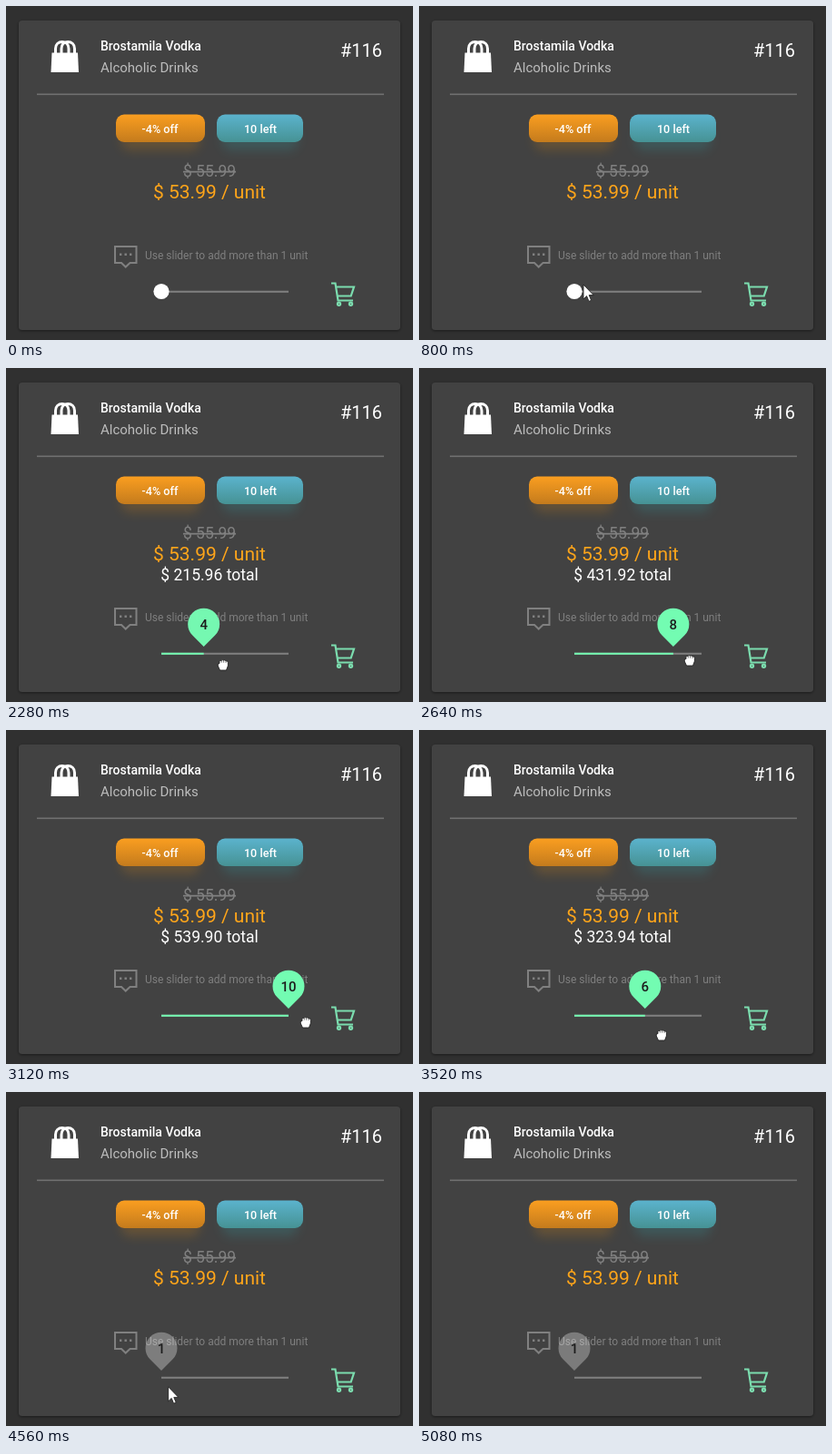
An HTML page that plays this animation: 448x368 px, repeating every 5920 ms.

```html
<!DOCTYPE html>
<html lang="en">
<head>
<meta charset="utf-8">
<title>Product card with quantity slider</title>
<style>
  html, body { margin: 0; width: 100%; height: 100%; overflow: hidden; background: #303030; }
  svg { display: block; width: 448px; height: 368px; font-family: Roboto, sans-serif; }
  .mid { text-anchor: middle; }
  .medium { font-weight: 500; }
  .line { fill: none; stroke-width: 2; }
</style>
</head>
<body>
<svg viewBox="0 0 448 368">
  <defs>
    <linearGradient id="orange" x2="0" y2="1"><stop stop-color="#fa9e20"/><stop offset="1" stop-color="#c47b1d"/></linearGradient>
    <linearGradient id="teal" x2="0" y2="1"><stop stop-color="#5bb3cd"/><stop offset="1" stop-color="#469294"/></linearGradient>
    <filter id="glow" x="-30%" y="-60%" width="160%" height="240%"><feGaussianBlur stdDeviation="6"/></filter>
    <filter id="shade" x="-5%" y="-5%" width="110%" height="110%"><feDropShadow dx="0" dy="1" stdDeviation="1.5" flood-opacity=".45"/></filter>
  </defs>

  <rect width="448" height="368" fill="#303030"/>
  <rect x="14" y="16" width="420" height="341" rx="4" fill="#424242" filter="url(#shade)"/>

  <g id="bag">
    <path d="M50.5 51.5H79L80 73H49.5Z" fill="#fff"/>
    <path d="M54.5 53V47C54.5 37 69 37 69 47V53M61 53V47C61 37 75.5 37 75.5 47V53" class="line" stroke="#fff" style="stroke-width:3"/>
  </g>
  <text x="104" y="49" font-size="14" class="medium" fill="#fff">Brostamila Vodka</text>
  <text x="104" y="72.5" font-size="15" fill="#bdbdbd">Alcoholic Drinks</text>
  <text x="414" y="55.5" font-size="20" text-anchor="end" fill="#fff">#116</text>
  <rect x="34" y="96.5" width="382" height="1.6" fill="#707070"/>

  <g filter="url(#glow)" opacity=".22">
    <rect x="127" y="132" width="86" height="27" rx="9" fill="#e08a10"/>
    <rect x="238" y="132" width="83" height="27" rx="9" fill="#30a5ad"/>
  </g>
  <rect x="121" y="119.5" width="98" height="30.5" rx="9" fill="url(#orange)"/>
  <rect x="232" y="119.5" width="95" height="30.5" rx="9" fill="url(#teal)"/>
  <g class="mid medium" font-size="12.6" fill="#fff">
    <text x="169.5" y="139.5">-4% off</text>
    <text x="280" y="139.5">10 left</text>
  </g>

  <g class="mid">
    <text x="224" y="188" font-size="17.5" fill="#808080" text-decoration="line-through">$ 55.99</text>
    <text x="224" y="212" font-size="21" fill="#ffa51a">$ 53.99 / unit</text>
    <text id="total" x="224" y="234" font-size="17.5" fill="#fff"></text>
  </g>

  <path d="M120 265H143.5V283H136.5L131.7 287.5L127 283H120Z" class="line" stroke="#808080"/>
  <path d="M125 273.7h2.4m3.1 0h2.4m3.1 0h2.4" class="line" stroke="#808080" style="stroke-width:2.4"/>
  <text x="153" y="278.5" font-size="12" fill="#7f7f7f">Use slider to add more than 1 unit</text>

  <g class="line" stroke="#7bdcae" style="stroke-width:2.2">
    <path d="M358 305.5H362.5L365.5 324.5H382M363.3 309.5H383L379.7 319.5H365"/>
    <circle cx="366.5" cy="328.3" r="1.6"/>
    <circle cx="379.5" cy="328.3" r="1.6"/>
  </g>

  <path d="M171 314.7H311" class="line" stroke="#808080"/>
  <path id="fill" class="line" stroke="#73fcb2"/>
  <circle id="knob" cx="171" cy="314.5" r="8.6" fill="#fff"/>
  <g id="pin">
    <path id="drop" d="M0 0L-12.4 -12.4A17.5 17.5 0 1 1 12.4 -12.4Z"/>
    <text id="count" class="mid medium" y="-19.5" font-size="15" fill="#1c1c1c"></text>
  </g>

  <g id="cursor" stroke="#222" stroke-width=".9" stroke-linejoin="round">
    <path id="arrow" fill="#fff" d="M-8 -10V6L-4.4 2.6L-2 8.4L.6 7.3L-1.8 1.6H3.2Z"/>
    <g id="hand">
      <path fill="#fff" d="M-3.5 6L-5.8 1Q-6.3 -1.8 -4 -1.5V-3.8Q-3.2 -5.7 -2 -4.4Q-.8 -6.2 .5 -4.7Q2 -6 3 -4.2Q5.2 -4.8 5.4 -2.5V1L3.5 6Z"/>
      <path d="M-1.7 -4V-2.3M.6 -4.3V-2.3M3 -3.8V-2.1" stroke-width=".6"/>
    </g>
  </g>
</svg>
<script>
const LOOP = 5920, STEP = 40;
const MIN_X = 171, UNIT_WIDTH = 140 / 9, GRAB_OFFSET = 14.5, PRICE = 53.99;
const HAND_ON = 1280, PRESS = 1720, LEAVE_MIN = 2000, BACK_TO_MIN = 4260, RELEASE = 4480, GONE = 5080;
const GREEN = [115, 252, 178, 1], GREY = [255, 255, 255, .3];

// Cursor path: time, x, y
const path = [
  [40, 448, 60], [200, 374, 128], [400, 262, 250], [600, 200, 313], [800, 189, 317],
  [1200, 185, 317], [1480, 185, 317], [1640, 192, 327], [PRESS, 192, 328], [1880, 192, 328],
  [LEAVE_MIN, 194, 328], [2280, 239, 327], [2640, 298, 322], [2960, 335, 320], [3080, 335, 320],
  [3120, 330, 322], [3520, 267, 336], [3880, 226, 337], [4240, 194, 338.5], [BACK_TO_MIN, 192, 338.5],
  [4400, 185, 338], [4600, 187, 334], [4760, 230, 306], [4880, 310, 258], [5040, 434, 190]
];

const el = id => document.getElementById(id);
const clamp = (v, lo, hi) => Math.min(hi, Math.max(lo, v));
const show = (id, on) => { el(id).style.display = on ? '' : 'none'; };
const ease = p => 1 - (1 - clamp(p, 0, 1)) ** 3;
const since = (t, start) => ease((t - start) / 400);

function cursorAt(t) {
  const i = path.findIndex(p => p[0] > t);
  if (i < 1) return (i ? path[path.length - 1] : path[0]).slice(1);
  const [a, b] = [path[i - 1], path[i]];
  const p = (t - a[0]) / (b[0] - a[0]);
  return [1, 2].map(k => a[k] + (b[k] - a[k]) * p);
}

function valueAt(t, x) {
  if (t < PRESS || t >= BACK_TO_MIN) return 1;
  return clamp(Math.round((x - GRAB_OFFSET - MIN_X) / UNIT_WIDTH) + 1, 1, 10);
}

function draw(t) {
  const [x, y] = cursorAt(t);
  const value = valueAt(t, x);
  const thumbX = MIN_X + (value - 1) * UNIT_WIDTH;

  const open = since(t, PRESS);
  el('knob').setAttribute('r', 8.6 * (1 - open));
  show('pin', open > 0);
  el('pin').setAttribute('transform', `translate(${thumbX} ${314.5 - 7.5 * open}) scale(${open})`);
  el('count').textContent = value;
  el('count').style.opacity = open;

  const green = since(t, LEAVE_MIN) - since(t, BACK_TO_MIN);
  const color = GREY.map((c, i) => c + (GREEN[i] - c) * green);
  el('drop').setAttribute('fill', `rgba(${color})`);

  show('fill', value > 1);
  el('fill').setAttribute('d', `M${MIN_X} 314.7H${thumbX}`);
  el('total').textContent = value > 1 ? `$ ${(PRICE * value).toFixed(2)} total` : '';

  const holding = t >= HAND_ON && t < RELEASE;
  show('cursor', t >= STEP && t < GONE);
  show('hand', holding);
  show('arrow', !holding);
  el('cursor').setAttribute('transform', `translate(${x} ${y})`);
}

const start = performance.now();
function tick() {
  const t = (performance.now() - start) % LOOP;
  draw(Math.floor(t / STEP) * STEP);
  requestAnimationFrame(tick);
}
tick();
</script>
</body>
</html>
```
